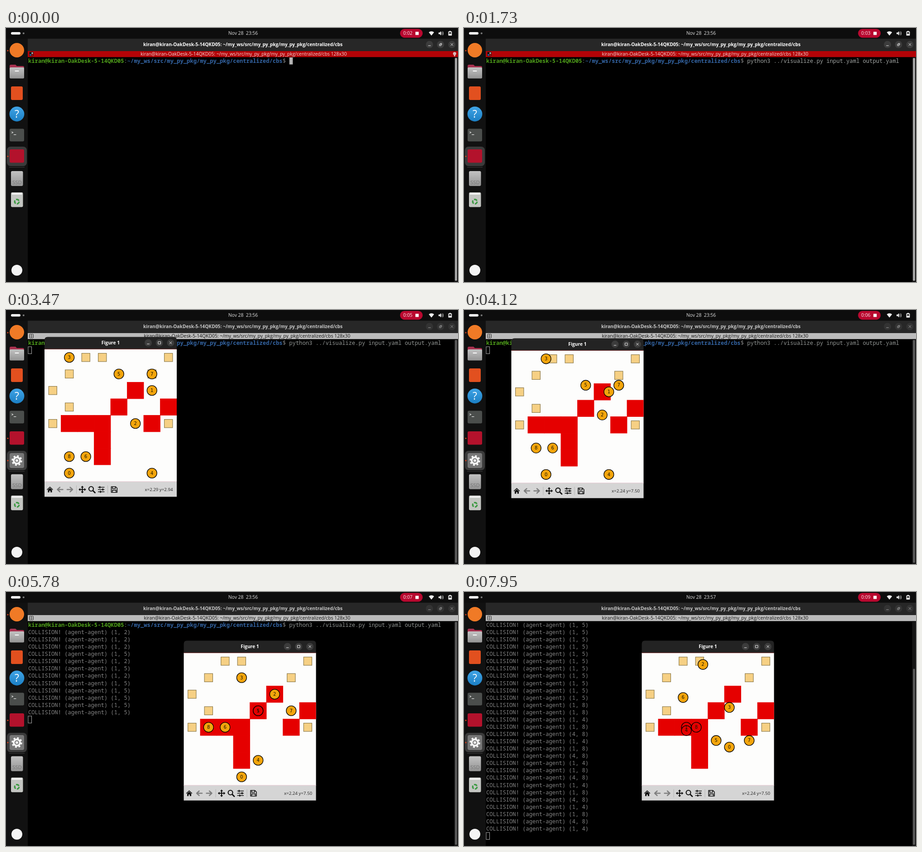
Write an HTML page that moves like this. It is 998 px wide and 561 px high and loops after 8000 ms.

```html
<!DOCTYPE html>
<html lang="en">
<head>
<meta charset="utf-8">
<title>Path planning in a terminal</title>
<style>
  html, body { margin: 0; width: 100%; height: 100%; overflow: hidden; background: #000; }
  svg { display: block; width: 100vw; height: 100vh; }
  text { white-space: pre; }
  .ui { font: 10.37px "Open Sans", "Noto Sans", sans-serif; }
  .bold { font-weight: 700; font-size: 10.26px; }
  .mid { text-anchor: middle; }
  .mono { font: 12.17px "Noto Sans Mono", "DejaVu Sans Mono", monospace; }
  .agent { font: 10px "DejaVu Sans", sans-serif; text-anchor: middle; fill: #1a1400; }
  .line { fill: none; stroke-linecap: round; stroke-linejoin: round; }
</style>
</head>
<body>
<svg viewBox="0 0 998 561" preserveAspectRatio="none">
  <defs>
    <clipPath id="screen"><rect x="48" y="64.5" width="942" height="497"/></clipPath>
    <clipPath id="axes"><rect y="27" width="292" height="293"/></clipPath>
    <linearGradient id="sky" x2="0" y2="1"><stop stop-color="#40a4e6"/><stop offset="1" stop-color="#1b7fc4"/></linearGradient>
    <linearGradient id="steel" x2="0" y2="1"><stop stop-color="#c2c2c2"/><stop offset="1" stop-color="#949494"/></linearGradient>
  </defs>

  <rect width="998" height="561" fill="#000"/>
  <rect width="48" height="561" fill="#111"/>
  <rect width="998" height="23.5" fill="#0d0d0d"/>

  <!-- top bar -->
  <rect x="11" y="9" width="21" height="5.4" rx="2.7" fill="#f4f4f4"/>
  <circle cx="38.8" cy="11.7" r="2" fill="#7c7c7c"/>
  <text id="clock" class="ui mid" x="523.5" y="15" fill="#e2e2e2"></text>
  <rect x="870" y="2" width="50" height="19.4" rx="9.7" fill="#b9082f"/>
  <text id="timer" class="ui" x="877" y="15.4" fill="#f6e4e8"></text>
  <rect x="904" y="8.4" width="7.2" height="7" fill="#fff"/>
  <g fill="#f0f0f0">
    <path d="M933.5 9.4Q939.3 5 945.2 9.4L939.3 16.8Z"/>
    <path d="M955 10h2.6l3-3v9.6l-3-3h-2.6z"/>
    <path class="line" stroke="#f0f0f0" d="M962.4 9.6q1.6 2.2 0 4.4M964.2 7.8q3 4 0 8"/>
    <path d="M979 6.4h3v1.2h1.6q.8 0 .8.8v7.6q0 .8-.8.8h-6.2q-.8 0-.8-.8v-7.6q0-.8.8-.8h1.6zM978.2 9.4v3h4.6v-3z" fill-rule="evenodd"/>
  </g>

  <!-- terminal window -->
  <rect x="48" y="23.5" width="950" height="27.5" fill="#272727"/>
  <text id="title" class="ui bold mid" x="523" y="40.2"></text>
  <g id="headBtns"></g>
  <rect id="bar" x="48" y="51" width="950" height="13.3"/>
  <g id="groupIcon"></g>
  <text id="subtitle" class="ui mid" y="61"></text>
  <g id="bell" fill="#d9b9b9">
    <circle cx="990.5" cy="56.5" r="3.6"/><path d="M989 59.5h3v3h-3z"/>
  </g>
  <g clip-path="url(#screen)"><g id="term" class="mono"></g></g>
  <rect x="989.5" y="64.3" width="8.5" height="497" fill="#151515"/>
  <rect id="thumb" x="991.3" width="4.6" rx="2.3"/>

  <!-- dock -->
  <rect id="focus" x="2" width="44" height="43" rx="8" fill="#3b3b3b"/>
  <circle cx="24" cy="49" r="16" fill="#f07a26"/>
  <path d="M8 84q0-3 3-3h10l3 3h13q3 0 3 3v8H8z" fill="#a8314f"/>
  <rect x="8" y="87" width="32" height="24.5" rx="2.5" fill="url(#steel)"/>
  <path class="line" d="M20.5 95h7" stroke="#fff" stroke-width="2"/>
  <rect x="11" y="129" width="26" height="30" rx="3" fill="#e2501f"/>
  <circle cx="24" cy="190" r="16.4" fill="url(#sky)"/>
  <text class="ui mid" x="24" y="198" fill="#fff" style="font-size:23px">?</text>
  <rect x="8" y="222.5" width="32" height="28" rx="3" fill="#4b4e4c"/>
  <text class="mono" x="11.5" y="234" fill="#fff" style="font-size:9px;font-weight:700">&gt;_</text>
  <rect x="8" y="268" width="32" height="29.5" rx="3" fill="#b3122c"/>
  <path id="rule" d="M7 307.5h34" stroke="#3f3f3f"/>
  <g id="gear">
    <rect x="8" y="316" width="32" height="33" rx="4" fill="#777"/>
    <circle cx="24" cy="332.5" r="10" fill="none" stroke="#f4f4f4" stroke-width="3.6" stroke-dasharray="3.927"/>
    <circle cx="24" cy="332.5" r="7" fill="none" stroke="#f4f4f4" stroke-width="4"/>
    <circle cx="24" cy="332.5" r="3" fill="#f4f4f4"/>
  </g>
  <g id="lower">
    <rect x="11" y="316" width="26.5" height="33" rx="3" fill="url(#steel)"/>
    <text class="ui mid" x="24.5" y="344.5" fill="#777" style="font-size:11.5px">SSD</text>
    <rect x="11" y="363" width="26.5" height="32.5" rx="3" fill="#c4c6c2"/>
    <path d="M13 364.5h22.5v3.5H13z" fill="#f3f3f3"/>
    <circle cx="24" cy="383.5" r="4.8" fill="none" stroke="#3c9a42" stroke-width="3.2" stroke-dasharray="7.4 2.653"/>
  </g>
  <g fill="#d8401c">
    <circle cx="4" cy="50" r="1.6"/><circle cx="4" cy="283.5" r="1.6"/>
    <circle id="gearDot" cx="4" cy="332.5" r="1.6"/>
  </g>
  <circle cx="24" cy="535" r="12" fill="#f4f4f4"/>

  <!-- figure window -->
  <g id="fig">
    <path d="M0 28V7q0-7 7-7h278q7 0 7 7v21z" fill="#232323"/>
    <text class="ui bold mid" x="146" y="16.8" fill="#fff">Figure 1</text>
    <g id="figBtns"></g>
    <rect y="27" width="292" height="293" fill="#fdfdfc"/>
    <g id="plot" clip-path="url(#axes)"></g>
    <path d="M0 26.8h292" stroke="#7a1414" stroke-width=".8"/>
    <rect y="319.5" width="292" height="33.5" fill="#d5d5d5"/>
    <path d="M0 319.5h292" stroke="#e6c6d0"/>
    <g transform="translate(0 337)">
      <path d="M5 0L12-6.5 19 0l-1.2 1L12-4.4 6.2 1z" fill="#111"/>
      <path d="M7.5.6L12-3.4l4.5 4v5.6h-3.2V2.8h-2.6v3.4H7.5z" fill="#111"/>
      <path class="line" d="M40.5 0H29M34-5l-5.5 5 5.5 5M50 0h11.5M56.5-5l5.5 5-5.5 5" stroke="#7f7f7f" stroke-width="2.5"/>
      <path d="M70.5-9v18M139.5-9v18" stroke="#b4b4b4"/>
      <path class="line" d="M77 0h13M83.5-6.5v13" stroke="#111" stroke-width="2.2"/>
      <path d="M75.3 0l3.7-3.2v6.4zM91.7 0L88-3.2v6.4zM83.5-8.2l3.2 3.7h-6.4zM83.5 8.2l3.2-3.7h-6.4z" fill="#111"/>
      <circle cx="103" cy="-1.5" r="5" fill="none" stroke="#111" stroke-width="2.2"/>
      <path class="line" d="M107 2.5l4.5 4.5" stroke="#111" stroke-width="2.8"/>
      <path d="M118-5h14.5M118 0h14.5M118 5h14.5" stroke="#111" stroke-width="1.7"/>
      <path d="M121-7.2h2.4v4.4H121zM127.5-2.2h2.4v4.4h-2.4zM122.5 2.8h2.4v4.4h-2.4z" fill="#111"/>
      <path class="line" d="M147.5-6.3h9.6l3.3 3.3v9.3h-12.9zM150-6v4h6.5v-4M150 6V1.4h8V6" stroke="#111" stroke-width="1.6"/>
    </g>
    <text id="coords" class="ui" x="283.5" y="340.5" text-anchor="end" fill="#222" style="font-size:9.7px"></text>
  </g>
</svg>
<script>
const LOOP = 8000, CELL = 36.5, ROW = 16.07, COL = 7.3, ROWS = 30;
const HOST = 'kiran@kiran-OakDesk-5-14QKD05:';
const PATH = '~/my_ws/src/my_py_pkg/my_py_pkg/centralized/cbs';
const COMMAND = 'python3 ../visualize.py input.yaml output.yaml';
const BELL_END = 800, RECALL = 1000, BLINK = 1600, ENTER = 1810, OPEN = 2200;

const $ = id => document.getElementById(id);
const set = (el, attrs) => { for (const k in attrs) el.setAttribute(k, attrs[k]); };
const show = (el, on) => el.setAttribute('visibility', on ? 'visible' : 'hidden');
const clamp = u => Math.min(1, Math.max(0, u));
const smooth = u => { u = clamp(u); return u * u * (3 - 2 * u); };

// start cell and one move per step; lower case letters are diagonals
const MOVES = { R: [1, 0], L: [-1, 0], U: [0, -1], D: [0, 1],
                a: [1, -1], b: [1, 1], c: [-1, 1], d: [-1, -1] };
const AGENTS = [
  [0, 7, 'RRRaa'], [7, 2, 'LLccL'], [5, 5, 'UUUdd'],
  [0, 0, 'RRbbb'], [7, 7, 'LLddd'], [4, 0, 'DDDDD'],
  [2, 7, 'UUUUU'], [6, 0, 'DDDDD'], [1, 7, 'UUURR']
];
const WALLS = ['52', '43', '73', '14', '24', '34', '64', '35', '36'];
const GOALS = ['20', '30', '70', '11', '61', '02', '13', '04', '74'];

function place([x, y, path], tick) {
  for (let i = 0; i < path.length; i++) {
    const part = clamp(tick / 10 - i), [dx, dy] = MOVES[path[i]];
    x += dx * part;
    y += dy * part;
  }
  return [x, y];
}

function collisions(tick) {
  const at = AGENTS.map(a => place(a, tick)), pairs = [];
  at.forEach((p, i) => at.forEach((q, j) => {
    if (i < j && Math.hypot(p[0] - q[0], p[1] - q[1]) < 0.695) pairs.push([i, j]);
  }));
  return pairs;
}

const hits = Array.from({ length: 50 }, (_, k) => collisions(k));
const log = hits.flatMap((pairs, tick) => pairs.map(pair => ({ tick, pair })));

// simulation time at a few moments
const PACE = [[2300, 0], [2450, .1], [2530, .205], [2670, .305], [4120, 1.605],
              [4920, 2.305], [6510, 3.605], [7950, 4.87], [8000, 4.89]];
function simTime(t) {
  if (t <= PACE[0][0]) return 0;
  const i = PACE.findIndex(p => t <= p[0]);
  const [t0, s0] = PACE[i - 1], [t1, s1] = PACE[i];
  return s0 + (s1 - s0) * (t - t0) / (t1 - t0);
}

// static parts
const mid = c => (+c + .5) * CELL;
const MINIMIZE = 'M-2.8 2.5h5.6', CLOSE = 'M-2.7-2.7l5.4 5.4M2.7-2.7l-5.4 5.4';
const MAXIMIZE = 'M-2.8-2.6h5.6v5.2h-5.6z', RESTORE = 'M-2.5-.8h3.4v3.4h-3.4zM-.8-2.4h3.3v3.3';
const buttons = (xs, y, size) => xs.map((x, i) => `<g transform="translate(${x} ${y})">
  <circle r="8" fill="#3c3c3c"/><path fill="none" stroke="#f0f0f0" d="${[MINIMIZE, size, CLOSE][i]}"/></g>`).join('');

$('headBtns').innerHTML = buttons([935, 959.5, 984.5], 36.5, RESTORE);
$('figBtns').innerHTML = buttons([229, 253.7, 278.5], 13, MAXIMIZE);
$('title').textContent = `${HOST} ${PATH}`;
$('subtitle').textContent = `${HOST} ${PATH} 128x30`;

const rowText = (r, body) => `<text x="49" y="${77 + r * ROW}" fill="#858585">${body}</text>`;
$('term').innerHTML =
  rowText(0, `<tspan fill="#4f9f1a" font-weight="700">${HOST.slice(0, -1)}</tspan>:` +
    `<tspan fill="#3465a4" font-weight="700">${PATH}</tspan>$ <tspan id="cmd"></tspan>`) +
  `<g id="log">${log.map((l, i) => rowText(i + 1, `COLLISION! (agent-agent) (${l.pair.join(', ')})`)).join('')}</g>` +
  '<rect id="cursor" width="7.5" height="15.5"/>';

$('plot').innerHTML = `<g transform="translate(0 27)">` +
  WALLS.map(([x, y]) => `<rect x="${x * CELL}" y="${y * CELL}" width="${CELL}" height="${CELL}" fill="#e50000" stroke="#e50000" stroke-width=".8"/>`).join('') +
  GOALS.map(([x, y]) => `<rect x="${mid(x) - 9.1}" y="${mid(y) - 9.1}" width="18.25" height="18.25" fill="#f6d084" stroke="#857343" stroke-width="1.1"/>`).join('') +
  `<g id="discs">${'<circle r="10.95" stroke="#000" stroke-width="1.3"/>'.repeat(AGENTS.length)}</g>` +
  `<g id="marks">${AGENTS.map((_, i) => `<text class="agent">${i}</text>`).join('')}</g></g>`;

const discs = [...$('discs').children], marks = [...$('marks').children], logRows = [...$('log').children];

function drawTop(t) {
  $('clock').textContent = 'Nov 28  23:' + (t < 7500 ? 56 : 57);
  $('timer').textContent = '0:0' + (2 + Math.floor(t / 1000));
}

function drawTerminal(t, time) {
  const active = t < OPEN, bell = t < BELL_END;
  set($('title'), { fill: active ? '#fff' : '#c6c6c6' });
  set($('bar'), { fill: active ? '#b40307' : '#bcbcbc' });
  set($('subtitle'), { x: bell ? 524.7 : 532.3, fill: active ? '#f3dada' : '#111' });
  set($('headBtns'), { opacity: active ? 1 : .6 });
  show($('bell'), bell);
  $('groupIcon').innerHTML = active
    ? '<path d="M51.5 53h9v9h-9z" fill="#141414"/><path d="M52.5 58h3v3h-3z" fill="#2f6fc0"/><path d="M56.5 54h3v3h-3z" fill="#c9c9c9"/><path d="M56.5 58h3v3h-3z" fill="#c01818"/>'
    : '<path d="M52 53.5h8v8h-8zM56 53.5v8M52 57.5h8" fill="#eee" stroke="#111"/>';

  const tick = Math.floor((time + .04) * 10);
  const count = log.filter(l => l.tick <= tick).length;
  const scroll = Math.max(0, count + 2 - ROWS);
  $('cmd').textContent = t < RECALL ? '' : COMMAND;
  set($('cmd'), { fill: active ? '#a2a6a4' : '#929694' });
  logRows.forEach((el, i) => show(el, i < count));
  set($('term'), { transform: `translate(0 ${-scroll * ROW})` });

  const typed = HOST.length + PATH.length + 2 + (t < RECALL ? 0 : COMMAND.length);
  const entered = t >= ENTER, row = entered ? count + 1 : 0;
  set($('cursor'), {
    x: entered ? 49 : 49 + typed * COL, y: 65 + row * ROW,
    fill: active ? '#b4b4b4' : 'none', stroke: active ? 'none' : '#b0b0b0'
  });
  show($('cursor'), t < BLINK || entered);

  const top = 66 + 492 * scroll / (ROWS + scroll);
  set($('thumb'), { y: top, height: 558.5 - top, fill: active ? '#adadad' : '#5c5c5c' });
}

function drawDock(t) {
  const open = t >= OPEN, grow = smooth((t - OPEN) / 110);
  set($('focus'), { y: open ? 311 : 262 });
  set($('rule'), { transform: `translate(0 ${49 * grow})` });
  set($('lower'), { transform: `translate(0 ${46.7 * grow})` });
  set($('gear'), { opacity: grow });
  show($('gearDot'), open);
}

function drawFigure(t, time) {
  show($('fig'), t >= OPEN);
  const grow = smooth((t - OPEN) / 110), drag = smooth((t - 4000) / 789);
  const x = 85 + 307.5 * drag, y = 59.5 + 48 * drag, scale = .9 + .1 * grow;
  set($('fig'), {
    opacity: grow,
    transform: `translate(${x + 146 * (1 - scale)} ${y + 176 * (1 - scale)}) scale(${scale})`
  });

  const tick = Math.floor(time * 10), hit = new Set(hits[tick].flat());
  AGENTS.forEach((agent, i) => {
    const [cx, cy] = place(agent, tick).map(mid);
    set(discs[i], { cx, cy, fill: hit.has(i) ? '#e50000' : '#f3a50c' });
    set(marks[i], { x: cx, y: cy + 3.3 });
  });

  const reach = smooth((t - 3300) / 400);
  $('coords').textContent = t < 3300 ? ''
    : `x=${(2.32 - .08 * reach).toFixed(2)} y=${(7.5 * reach).toFixed(2)}`;
}

function frame(now) {
  const t = now % LOOP, time = simTime(t);
  drawTop(t);
  drawTerminal(t, time);
  drawDock(t);
  drawFigure(t, time);
  requestAnimationFrame(frame);
}
frame(0);
</script>
</body>
</html>
```
